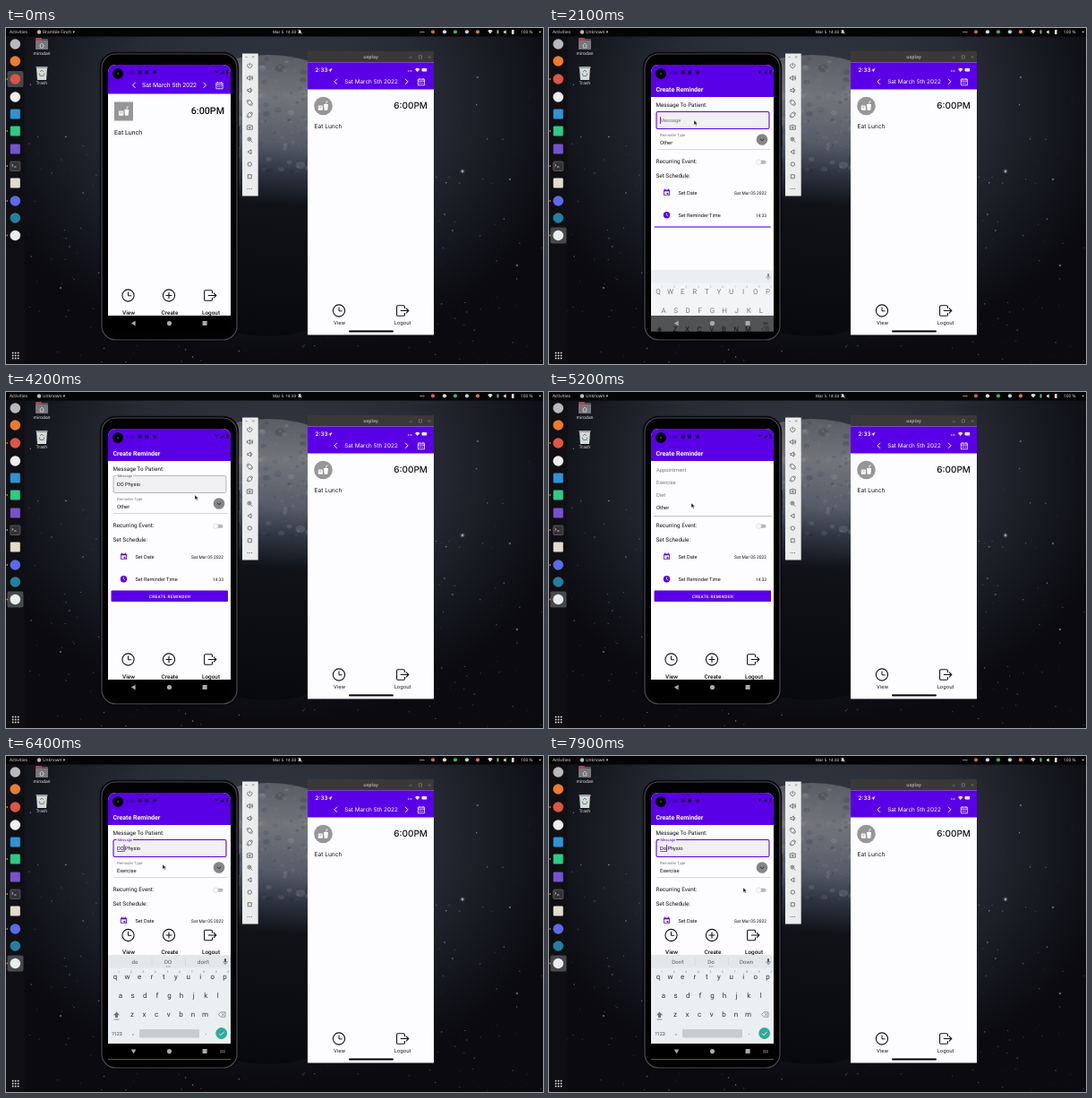
These frames come from a looping animation (600 px wide and 375 px high, 8 s). An HTML page:

```html
<!DOCTYPE html>
<html lang="en">
<head>
<meta charset="utf-8">
<title>Reminder app demo</title>
<style>
html, body { margin: 0; height: 100%; overflow: hidden; background: #0a0a0f; }
svg { display: block; width: 100vw; height: 100vh; }
text { font-family: Roboto, "Noto Sans", sans-serif; white-space: pre; text-rendering: geometricPrecision; }
.ui { font-family: "Noto Sans", "Open Sans", sans-serif; }
.ios { font-family: Inter, Roboto, sans-serif; }
</style>
</head>
<body>
<svg id="stage" viewBox="0 0 600 375" preserveAspectRatio="none"></svg>
<script>
const PURPLE = '#5a00e6', INK = '#111', PAPER = '#fdfcff';

let seed = 11;
const rnd = () => (seed = (seed * 16807) % 2147483647) / 2147483647;
const range = (n, fn) => Array.from({ length: n }, (_, i) => fn(i)).join('');

// Markup helpers
const rect = (x, y, w, h, fill, more = '') => `<rect x="${x}" y="${y}" width="${w}" height="${h}" fill="${fill}" ${more}/>`;
const dot = (x, y, r, fill, more = '') => `<circle cx="${x}" cy="${y}" r="${r}" fill="${fill}" ${more}/>`;
const line = (d, color, w = 1, more = '') => `<path d="${d}" fill="none" stroke="${color}" stroke-width="${w}" ${more}/>`;
const shape = (d, fill, more = '') => `<path d="${d}" fill="${fill}" ${more}/>`;
const text = (s, x, y, size, fill = INK, more = '') => `<text x="${x}" y="${y}" font-size="${size}" fill="${fill}" ${more}>${s}</text>`;
const at = (x, y, body, more = '') => `<g transform="translate(${x} ${y})" ${more}>${body}</g>`;
const group = (id, body, more = '') => `<g id="${id}" ${more}>${body}</g>`;
const MID = 'text-anchor="middle"', END = 'text-anchor="end"', MED = 'font-weight="500"', BOLD = 'font-weight="700"';
const UI = 'class="ui"', IOS = 'class="ios"';

// Icons, centred on 0,0
const clock = dot(0, 0, 6.6, 'none', 'stroke="#111" stroke-width="1.1"') + line('M0-4V.3H3.6', INK, 1);
const plus = dot(0, 0, 6.6, 'none', 'stroke="#111" stroke-width="1.1"') + line('M-3.4 0H3.4M0-3.4V3.4', INK, 1.1);
const logout = line('M2.5-2.6V-4.4Q2.5-5.8 1-5.8H-5Q-6.4-5.8-6.4-4.4V4.4Q-6.4 5.8-5 5.8H1Q2.5 5.8 2.5 4.4V2.6M-2.2 0H6.6M4-2.8L6.8 0L4 2.8', INK, 1.1);
const calendar = line('M-3.6-3H3.6V3.6H-3.6ZM-3.6-1H3.6M-2-4.3V-2.6M2-4.3V-2.6', '#fff', .8) + line('M-2 1.2H2.2', '#fff', .9, 'stroke-dasharray="1 .7"');
const meal = rect(-5.2, -1, 5.2, 5.2, '#fff', 'rx=".6"') + line('M-4-.2V2.2M-2.5-.2V2.2M-1-.2V2.2', '#999', .5) +
  shape('M1-2.6H6L5.3 4.2H1.7Z', '#fff') + line('M3.5-2.6L4.2-5.5H5.7', '#fff', .8);

const dateBar = (x, y, size, cls) =>
  text('Sat March 5th 2022', x, y, size, '#fff', `${MID} ${cls}`) +
  line(`M${x - 38} ${y - 5.2}l-3 3l3 3M${x + 38} ${y - 5.2}l3 3l-3 3`, '#fff', 1) + at(x + 56, y - 1.8, calendar);

function sky() {
  const colors = ['#a9b4c8', '#7d8899', '#99655f', '#5f789c', '#85594f'];
  const stars = range(300, () => dot((rnd() * 600).toFixed(1), (10 + Math.sqrt(rnd()) * 364).toFixed(1), (.3 + rnd() * .5).toFixed(2),
    colors[Math.floor(rnd() * 5)], `opacity="${(.35 + rnd() * .6).toFixed(2)}"`));
  const bright = [[510, 160, 2], [563, 169, 1], [571, 265, 1.1], [527, 55, .9], [490, 208, .8], [86, 184, .8], [61, 290, .9]]
    .map(([x, y, r]) => dot(x, y, r * 1.4, '#3f4f68', 'opacity=".5"') + dot(x, y, r * .7, '#96a3b5')).join('');
  const spots = range(170, () => {
    const y = 32 + rnd() * 130, size = .6 + rnd() * rnd() * 5;
    return `<ellipse cx="${250 + rnd() * 95}" cy="${y}" rx="${size * 1.3}" ry="${size}" fill="${rnd() < .5 ? '#161c28' : '#a3a6ad'}" opacity="${.06 + rnd() * .18}"/>`;
  });
  return rect(0, 0, 600, 375, 'url(#space)') + stars + bright +
    dot(293, 187, 157, 'url(#moon)') + `<g clip-path="url(#disc)">${spots}</g>`;
}

function desktop() {
  const folder = rect(33, 12, 14, 12, '#55555a', 'rx="1"') + rect(33, 11, 7, 3, '#a4475a', 'rx=".8"') +
    rect(33, 14, 14, 10, '#77777b', 'rx="1"') + line('M37.5 19.5L40 17L42.5 19.5M38.3 19V22H41.7V19', '#ddd', .7);
  const trash = shape('M34 44H46L45 58H35Z', '#d8d9d8') + rect(33.5, 43, 13, 2, '#9da09d', 'rx=".6"') +
    line('M38 49L40 47L42 49M42.7 50.5L42 53.5H38L37.3 50.5', '#4f9a68', 1);
  return folder + trash + text('mirodan', 40, 30, 4.8, '#eee', `${MID} ${UI}`) + text('Trash', 40, 63, 4.8, '#eee', `${MID} ${UI}`);
}

function topBar() {
  const tray = [[477, '#d65b58'], [490, '#ddd'], [502, '#39b36a'], [515, '#c9ced6'], [527, '#d9774c']]
    .map(([x, c]) => dot(x, 4.3, 2.1, c)).join('');
  return rect(0, 0, 600, 9.5, '#050506') + text('Activities', 4, 6.3, 4.8, '#ddd', UI) +
    dot(37, 4.5, 2.2, '#bbb') + text('', 41, 6.3, 4.8, '#ddd', `id="app" ${UI}`) +
    text('Mar 5&#160; 14:33', 298, 6.3, 4.5, '#eee', UI) +
    shape('M326.2 5.8Q327 5 327 3.6Q327 2 328.2 2T329.5 3.6Q329.5 5 330.4 5.8Z', '#ddd') + line('M326 2L330.7 6.8', '#ddd', .5) +
    line('M462.5 4.5h5', '#ddd', 1.1, 'stroke-dasharray="1.1 .8"') + tray +
    shape('M538.3 3.2Q541 1 543.7 3.2L541 6.5Z', '#ddd') + rect(548.5, 2.2, 2, 4.4, '#53c38b', 'rx=".8"') +
    shape('M556 3.6h1.3l1.5-1.4v4.6l-1.5-1.4H556Z', '#ddd') + rect(565, 2, 2.6, 5, '#ddd', 'rx=".4"') +
    text('100 %', 575, 6.3, 4.8, '#ddd', UI) + shape('M595.3 3.8h2.8l-1.4 1.7Z', '#ddd');
}

function dock() {
  const apps = [[18, '#b9b9bd', 0], [37, '#ee7b2d', 0], [57, '#dc5645', 0], [77, '#efedf0', 0], [96, '#2f93d4', 1], [115, '#2dcb83', 1],
    [135, '#7652cf', 1], [173, '#e2dcc9', 1], [193, '#5b6bea', 0], [212, '#257f9f', 0], [231.5, '#e7eeec', 0]];
  return rect(0, 9.5, 20.5, 366, '#101014', 'opacity=".92"') + rect(1.5, 0, 18, 18, '#47484d', 'id="active" rx="2"') +
    apps.map(([y, c, square]) => square ? rect(4.8, y - 5.5, 11, 11, c, 'rx="1.3"') : dot(10.3, y, 5.8, c)).join('') +
    rect(4.8, 149, 11, 10.5, '#333238', 'rx="1.2" stroke="#77777b" stroke-width=".6"') + line('M6.5 152l1.6 1.3l-1.6 1.3M9 155h2.5', '#eee', .7) +
    [57, 115, 154, 193, 231.5].map(y => dot(1.2, y, .9, '#e0622c')).join('') +
    range(9, i => rect(6.8 + i % 3 * 3, 361.7 + Math.floor(i / 3) * 3, 1.7, 1.7, '#ddd', 'rx=".4"'));
}

function toolbar() {
  const icons = ['M-1.5-2.2A2.6 2.6 0 1 0 1.5-2.2M0-3.2V0', 'M-3-1H-1.5L.3-2.6V2.6L-1.5 1H-3ZM1.5-1.5Q2.7 0 1.5 1.5M2.5-2.6Q4.4 0 2.5 2.6',
    'M-2.5-1H-1L1-2.6V2.6L-1 1H-2.5ZM2-1.3Q3 0 2 1.3', 'M0-3L2.8 0L0 3L-2.8 0ZM-3.3-1Q-3-3-1-3.3M3.3 1Q3 3 1 3.3',
    'M0-3L2.8 0L0 3L-2.8 0ZM3.3-1Q3-3 1-3.3M-3.3 1Q-3 3-1 3.3', 'M-3-1.8H-1.3L-.6-2.7H.6L1.3-1.8H3V2.5H-3ZM-1 .3a1 1 0 1 0 2 0a1 1 0 1 0-2 0',
    'M1.2 1.2L3 3M-2.4-.4a2 2 0 1 0 4 0a2 2 0 1 0-4 0M-1.4-.4h2M-.4-1.4v2', 'M1.7-2.4V2.4L-2.3 0Z',
    'M-2.2 0a2.2 2.2 0 1 0 4.4 0a2.2 2.2 0 1 0-4.4 0', 'M-2-2H2V2H-2Z', 'M-2.6 0h.9M-.45 0h.9M1.7 0h.9'];
  return rect(264, 28.5, 17.7, 159, '#ececed') +
    line('M267.5 32.5h2.4M275 31.2l2.4 2.4M277.4 31.2l-2.4 2.4', '#777', .6) +
    icons.map((d, i) => at(272.3, 42 + i * 13.75, line(d, '#555c63', i === 10 ? 1.1 : .8))).join('');
}

function mirror() {
  return rect(337, 26, 141, 13, '#3a3938') + text('uxplay', 407.5, 33.8, 5, '#a9a6a3', `${MID} ${BOLD} ${UI}`) +
    line('M450.5 33h3.4M461.3 30.8h3.2v3.2h-3.2ZM471.8 31.3l2.4 2.4M474.2 31.3l-2.4 2.4', '#8b8987', .6) +
    rect(337, 38.5, 141, 304, PAPER) + rect(337, 38.5, 141, 30, PURPLE) +
    text('2:33', 345.5, 49.3, 6.3, '#fff', `font-weight="600" ${IOS}`) + shape('M360 47.3L364.5 44.8L362.4 49.4L362 47.4Z', '#fff') +
    line('M449 48h5', '#fff', 1, 'stroke-dasharray="1 .5"') + shape('M457 46Q459.7 43.6 462.4 46L459.7 49Z', '#fff') +
    rect(464.5, 45, 5.7, 3.4, '#fff', 'rx=".9"') +
    dateBar(408, 62, 6.4, IOS) + dot(354.5, 87, 10.3, '#969696') + at(354, 87.5, meal) +
    text('6:00PM', 471, 90, 10, INK, `${END} ${MED} ${IOS}`) + text('Eat Lunch', 344.5, 112, 6.6, INK, IOS) +
    at(372, 315.5, clock) + at(443, 315.5, logout) + text('View', 372.5, 330.5, 5.6, INK, `${MID} ${IOS}`) +
    text('Logout', 443, 330.5, 5.7, INK, `${MID} ${IOS}`) + rect(383, 337.6, 50, 1.9, '#000', 'rx="1"');
}

function form() {
  return text('Message To Patient:', 119.5, 87.5, 6.3) +
    rect(120, 93.5, 126, 19, '#f0eff2', 'id="field" rx="1.6"') + rect(123.5, 91.5, 18.5, 4, '#f6f5f9', 'id="notch"') +
    text('Message', 124.5, 95.2, 4.1, '#666', 'id="label"') + text('Message', 124, 105.3, 5.7, '#777', 'id="hint"') +
    text('<tspan></tspan><tspan text-decoration="underline"></tspan><tspan></tspan>', 124, 105.3, 5.7, INK, 'id="value"') +
    rect(124, 99, .8, 8, PURPLE, 'id="caret"') +
    text('Reminder Type', 124, 121, 4.3, '#777') + text('', 124, 130, 5.8, INK, 'id="kind"') +
    dot(238, 124.5, 6.3, '#858585') + line('M235.8 123.6l2.2 2.1l2.2-2.1', '#222', .9) + line('M120.5 135.5H247.5', '#c8c7cc', .7) +
    text('Recurring Event:', 119.5, 150.7, 6.4) + rect(233, 147.7, 9.5, 4, '#b5b4b8', 'rx="2"') + dot(234.3, 149.7, 2.8, '#fafafa', 'stroke="#ccc" stroke-width=".5"') +
    text('Set Schedule:', 119.5, 167.3, 6.4) +
    at(131.5, 183.5, rect(-3.4, -3, 6.8, 6.6, PURPLE, 'rx=".7"') + rect(-2.6, -1.2, 5.2, 4, '#fff') + rect(0, .4, 1.9, 1.8, PURPLE) + line('M-2-4V-2.5M2-4V-2.5', PURPLE, .8)) +
    text('Set Date', 144.5, 185.8, 5.6) + text('Sat Mar 05 2022', 243, 185.6, 4.9, INK, END) +
    dot(131.5, 208.8, 3.7, PURPLE) + line('M131.5 206.5V209L133.2 210', '#fff', .7) +
    text('Set Reminder Time', 144.5, 211, 5.6) + text('14:33', 243, 211, 4.9, INK, END) +
    rect(117.5, 221.5, 130.5, 12.5, PURPLE, 'rx="1"') + text('CREATE REMINDER', 183, 229.6, 4.6, '#fff', `${MID} ${MED} letter-spacing=".4"`);
}

function keyboard() {
  const rows = ['qwertyuiop', 'asdfghjkl', 'zxcvbnm'], left = [122, 128, 141];
  const letters = fn => rows.map((row, r) => [...row].map((k, i) => text(fn(k), left[r] + i * 13.6, 249 + r * 21, 8, '#30363a', MID)).join('')).join('');
  return rect(114, 222, 137, 117, '#eceff1') + rect(114, 222, 137, 14.5, '#e3e7e9') +
    group('words', [144, 181, 220.5].map((x, i) => text('', x, 232, 6, '#50575b', MID)).join('') +
      line('M163 225.5V234M200.5 225.5V234', '#c3c8cb', .5) + line('M179 235h4.4', '#555', .8, 'stroke-dasharray=".9 .8"')) +
    rect(243.9, 226, 2.2, 4.4, '#555', 'rx="1.1"') + line('M242.7 229Q242.7 231.6 245 231.6T247.3 229M245 231.6V233.3', '#555', .6) +
    range(10, i => text((i + 1) % 10, 126 + i * 13.6, 241.5, 3.4, '#777', MID)) +
    group('lower', letters(k => k)) + group('upper', letters(k => k.toUpperCase())) +
    shape('M123.5 285.5L127 289.3H125V292H122V289.3H120Z', '#6d7478') + line('M120.5 294h6', '#6d7478', .8) +
    line('M237.5 288.5L240 285.8H245V291.2H240ZM241.2 287.2l2.5 2.6M243.7 287.2l-2.5 2.6', '#6d7478', .7) +
    text('?123', 124, 311.5, 5.4, '#444', MID) + text(',', 142, 311, 7, '#333', MID) + text('.', 223.5, 311, 7, '#333', MID) +
    rect(149, 305, 67, 9.5, '#c8cccf', 'rx="1"') + dot(240.7, 309.5, 6.4, '#30a99c') + line('M238 309.7l2 2l3.6-4', '#fff', .9);
}

function phone() {
  const tabs = rect(114, 285.5, 137, 36, PAPER) + at(136.5, 298.5, clock) + at(182, 298.5, plus) + at(228, 298.5, logout) +
    ['View', 'Create', 'Logout'].map((s, i) => text(s, 137 + i * 46, 319.6, 6.4, INK, `${MID} ${MED}`)).join('');
  const home = dateBar(182.5, 66, 7, '') + rect(121, 82.5, 21, 21, '#969696') + at(131.3, 93.5, meal) +
    text('6:00PM', 244, 96, 10.7, INK, `${END} ${MED}`) + text('Eat Lunch', 121, 118.5, 7.1);
  const menu = rect(114, 77, 137, 62, PAPER) + rect(117, 138, 132, 1.2, '#c4c3c9') +
    ['Appointment', 'Exercise', 'Diet', 'Other'].map((s, i) => text(s, 120, 89 + i * 14, 5.8, i === 3 ? INK : '#77767b')).join('');
  const status = dot(125, 51, 6, '#000') + dot(125, 51, 1.3, '#17432e') + text('2:33', 134, 51.8, 5, '#2a0a70') +
    rect(147.5, 47.5, 4.4, 4, '#1d0550', 'rx="1"') + rect(155, 47.5, 4, 4, '#1d0550', 'rx=".6"') + dot(166, 49.5, 2.1, '#1d0550') +
    shape('M233 47.6h5l-2.5 3.5ZM239.5 51.3l4-4v4ZM246 47h2.4v4.4H246Z', '#1d0550');
  const nav = rect(114, 321, 137, 17.5, '#000', 'id="navBack"') + shape('M144.6 326.8V332.4L139.8 329.6Z', '#aaa', 'id="back"') +
    dot(182.5, 329.6, 2.6, '#aaa') + rect(219.6, 327, 5, 5, '#aaa') +
    group('keyIcon', rect(239, 328, 6, 3.5, '#444', 'rx=".5"') + line('M240 329.3h4', '#111', .6, 'stroke-dasharray=".6 .4"'));
  return rect(259.5, 110, 1.6, 23, '#333') + rect(259.5, 145, 1.6, 28, '#333') +
    rect(104.8, 26.8, 155.4, 323.4, '#08080a', 'rx="17.5"') + rect(107, 29, 151, 319, '#020203', 'rx="15.5" stroke="#4a4b50" stroke-width="1.2"') +
    `<g clip-path="url(#screen)">` + rect(114, 41, 137, 281, PAPER) + rect(114, 41, 137, 32.5, PURPLE) +
    group('home', home) +
    group('create', rect(114, 73, 137, 4, PURPLE) + text('Create Reminder', 119.5, 70.6, 7, '#fff', BOLD) + form()) +
    rect(114, 222.6, 137, 100, PAPER, 'id="gap"') + group('tabs', tabs) + group('menu', menu) +
    rect(114, 321, 137, 18, '#000') + group('keys', keyboard()) + nav + status + '</g>';
}

const stage = document.getElementById('stage');
stage.innerHTML = `<defs>
<radialGradient id="space" gradientUnits="userSpaceOnUse" cx="0" cy="0" r="340" gradientTransform="translate(300 85) scale(1 .83)"><stop offset="0" stop-color="#343842"/><stop offset=".5" stop-color="#272b34"/><stop offset=".8" stop-color="#15171e"/><stop offset="1" stop-color="#0a0a0f"/></radialGradient>
<linearGradient id="moon" x1=".55" y1="0" x2=".47" y2="1"><stop offset="0" stop-color="#5b5d65"/><stop offset=".15" stop-color="#72747a"/><stop offset=".31" stop-color="#565c68"/><stop offset=".42" stop-color="#2d3440"/><stop offset=".53" stop-color="#101217"/><stop offset="1" stop-color="#08090c"/></linearGradient>
<clipPath id="disc"><circle cx="293" cy="187" r="157"/></clipPath>
<clipPath id="screen"><path d="M114 50Q114 41 123 41H242Q251 41 251 50V338.5H114Z"/></clipPath></defs>` +
  sky() + desktop() + topBar() + dock() + phone() + toolbar() + mirror() +
  group('mouse', shape('M0 0V5.2L1.3 4.1L2.2 6L3.2 5.5L2.3 3.7H4Z', '#111', 'stroke="#eee" stroke-width=".45"'));

const $ = id => document.getElementById(id);
const set = (id, attrs) => { for (const k in attrs) $(id).setAttribute(k, attrs[k]); };
const show = (id, on) => set(id, { display: on ? 'inline' : 'none' });

// Timing tables
const TYPING = [
  [0, '', '', '', []], [2450, '', 'D', '', ['do', 'D', "don't"]], [2600, '', 'DO', '', ['do', 'DO', "don't"]],
  [2800, 'DO ', '', '', ['the', 'it', 'that']], [2950, 'DO ', 'P', '', ['p', 'P', 'Please']], [3050, 'DO ', 'Ph', '', ['PH', 'Ph', 'Photo']],
  [3200, 'DO ', 'Phy', '', ['Phys', 'Phy', 'Physical']], [3300, 'DO ', 'Phys', '', ['Phys', 'Physics', 'Physical']],
  [3400, 'DO ', 'Physi', '', ['Physic', 'Physio', 'Physical']], [3500, 'DO ', 'Physio', '', ['Physic', 'Physio', 'Physical']],
  [3750, 'DO Physio', '', '', []], [6000, '', 'DO', ' Physio', ['do', 'DO', "don't"]],
  [7200, '', 'D', ' Physio', ['do', 'D', "don't"]], [7450, '', 'Do', ' Physio', ["Don't", 'Do', 'Down']]];
const MOUSE = [[400, 226, 240], [900, 182, 300], [1250, 182, 300], [1800, 162, 103], [3700, 162, 103], [4200, 211, 115], [4500, 238, 124],
  [4750, 238, 124], [5200, 159, 124], [5450, 152, 101], [5700, 152, 101], [5900, 135, 103], [6100, 135, 103], [6400, 175, 121], [7100, 175, 121], [7700, 217, 147]];
const KEYS = [[1950, 117], [2100, 48], [2300, 0], [3750, 0], [3950, 117], [6000, 117], [6150, 48], [6350, 0]];

const step = (table, t) => table.filter(row => row[0] <= t).pop() || table[0];
function track(table, t) {
  const next = table.findIndex(row => row[0] > t);
  if (next === 0) return table[0].slice(1);
  if (next < 0) return table[table.length - 1].slice(1);
  const a = table[next - 1], b = table[next], p = (t - a[0]) / (b[0] - a[0]), e = p * p * (3 - 2 * p);
  return a.slice(1).map((v, i) => v + (b[i + 1] - v) * e);
}

function render(t) {
  const creating = t >= 1250, unfocused = t < 1000;
  const focused = t >= 1900 && t < 3750 || t >= 6000;
  const [drop] = track(KEYS, t), open = drop < 1, sliding = !open && drop < 117;

  $('app').textContent = unfocused ? 'Bramble Finch ▾' : 'Unknown ▾';
  set('active', { y: unfocused ? 48 : 222.5 });
  show('home', !creating);
  show('create', creating);
  show('menu', t >= 4700 && t < 5650);
  show('tabs', !sliding);
  set('tabs', { transform: `translate(0 ${open ? -98.5 : 0})` });
  show('gap', open || sliding);

  show('keys', drop < 117);
  set('keys', { transform: `translate(0 ${drop.toFixed(2)})`, opacity: (1 - drop / 130).toFixed(2) });
  show('upper', t < 2450);
  show('lower', t >= 2450);
  set('navBack', { opacity: sliding ? .45 : 1 });
  set('back', { transform: open ? 'rotate(-90 142.5 329.6)' : '' });
  show('keyIcon', drop < 117);

  const [, pre, word, post, words] = step(TYPING, t);
  const filled = pre + word + post !== '';
  [...$('value').children].forEach((el, i) => { el.textContent = [pre, word, post][i]; });
  const typed = (pre + word).length;
  show('hint', !filled);
  show('label', filled);
  show('notch', filled);
  set('label', { fill: focused ? PURPLE : '#666' });
  set('field', { stroke: focused ? PURPLE : '#8b8a90', 'stroke-width': focused ? 1.1 : .6 });
  show('caret', focused);
  set('caret', { x: 124 + (typed ? $('value').getSubStringLength(0, typed) : 0) });
  $('kind').textContent = t < 5550 ? 'Other' : 'Exercise';
  show('words', words.length > 0);
  $('words').querySelectorAll('text').forEach((el, i) => { el.textContent = words[i] || ''; });

  const [x, y] = track(MOUSE, t);
  show('mouse', t >= 400);
  set('mouse', { transform: `translate(${x.toFixed(2)} ${y.toFixed(2)})` });
}

const start = performance.now();
function frame() {
  render((performance.now() - start) % 8000);
  requestAnimationFrame(frame);
}
render(0);
requestAnimationFrame(frame);
</script>
</body>
</html>
```
